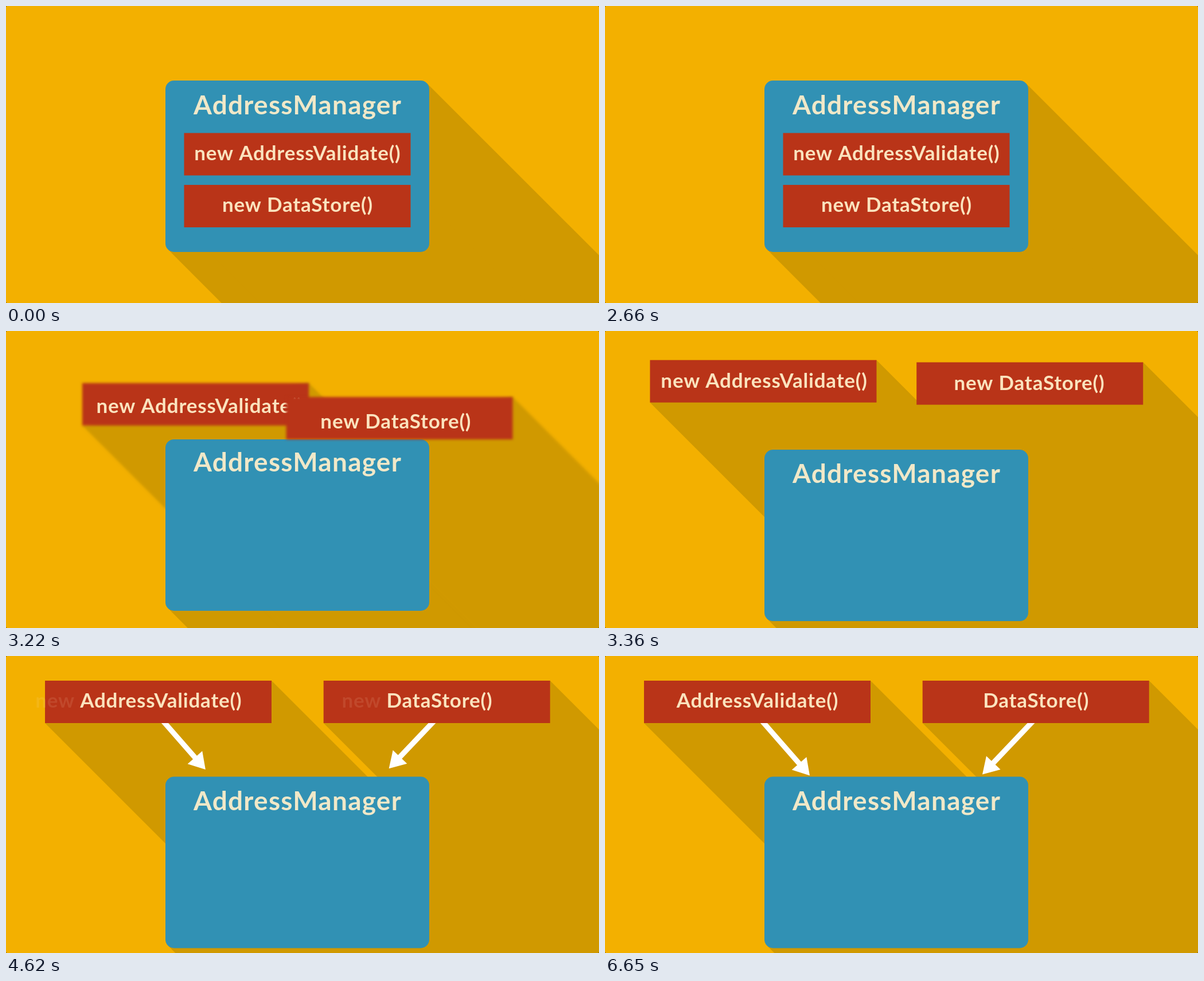
These frames come from a looping animation (1034 px wide and 518 px high, 6720 ms). An HTML page with a canvas:

```html
<!DOCTYPE html>
<html>
<head>
<meta charset="utf-8">
<style>
html, body { margin: 0; width: 100%; height: 100%; overflow: hidden; background: #4a3a10; }
canvas { display: block; border-radius: 2px; }
</style>
</head>
<body>
<canvas id="stage" width="1034" height="518"></canvas>
<script>
const ctx = document.getElementById('stage').getContext('2d');
const LOOP = 6720, STEP = 70, DURATION = 520, TEXT_LAG = 7;
const SPREAD_AT = 2999, INJECT_AT = 4330;
const YELLOW = '#f3b000', SHADE = '#d09900', BLUE = '#3191b4', RED = '#b93418';

const manager = { from: [278, 130], to: [278, 210.5], w: 460, h: 299, r: 15 };
const services = [
  { name: 'AddressValidate()', from: [310.5, 221.5], to: [68, 43], w: 395, h: 74 },
  { name: 'DataStore()', from: [310.5, 312], to: [553.7, 43], w: 395, h: 74 }
];
const arrows = [
  { tail: [277, 117], tip: [357, 208.5] },
  { tail: [743, 117], tip: [658, 206.5] }
];

const mix = (a, b, p) => a + (b - a) * p;
const place = (box, p) => box.from.map((v, i) => mix(v, box.to[i], p));

// Quick start with a long settle: cubic bezier (.6, 0, 0, 1)
function ease(t, start) {
  const x = Math.min(1, Math.max(0, (t - start) / DURATION));
  let lo = 0, hi = 1;
  for (let i = 0; i < 24; i++) {
    const s = (lo + hi) / 2;
    if (1.8 * s * (1 - s) ** 2 + s ** 3 < x) lo = s; else hi = s;
  }
  return x === 1 ? 1 : lo * lo * (3 - 2 * lo);
}

function longShadow([x, y], w, h, r = 0) {
  const c = r * (1 - Math.SQRT1_2), far = 1200;
  const right = x + w - c, top = y + c, left = x + c, bottom = y + h - c;
  ctx.fillStyle = SHADE;
  ctx.beginPath();
  ctx.moveTo(right, top);
  ctx.lineTo(right + far, top + far);
  ctx.lineTo(left + far, bottom + far);
  ctx.lineTo(left, bottom);
  ctx.fill();
}

function setFont(size, spacing, color) {
  ctx.font = `700 ${size}px Lato, sans-serif`;
  ctx.letterSpacing = spacing + 'px';
  ctx.fillStyle = color;
}

function drawArrow({ tail, tip }, p) {
  if (p <= 0) return;
  const dx = tip[0] - tail[0], dy = tip[1] - tail[1];
  const length = Math.hypot(dx, dy), end = mix(-2, length, p);
  ctx.save();
  ctx.translate(...tail);
  ctx.rotate(Math.atan2(dy, dx));
  ctx.fillStyle = '#fff';
  ctx.fillRect(-20, -4.6, end, 9.2);
  ctx.beginPath();
  ctx.moveTo(end, 0);
  ctx.lineTo(end - 28, -17);
  ctx.lineTo(end - 28, 17);
  ctx.fill();
  ctx.restore();
}

function drawLabel(box, p, injected) {
  const [x, y] = place(box, p);
  setFont(35, 0.8, '#fbe3be');
  const center = x + box.w / 2 + 0.4, base = y + 47.4;
  const prefix = ctx.measureText('new ').width, width = ctx.measureText(box.name).width;
  const start = center - (prefix + width) / 2;
  const nameX = mix(start + prefix, center - width / 2, injected);
  ctx.fillText(box.name, nameX, base);
  ctx.globalAlpha = 1 - injected;
  ctx.fillText('new ', nameX - prefix, base);
  ctx.globalAlpha = 1;
}

function draw(t) {
  const p = ease(t, SPREAD_AT), textP = ease(t - TEXT_LAG, SPREAD_AT);
  const injected = ease(t, INJECT_AT);
  const speed = ease(t + 20, SPREAD_AT) - ease(t - 20, SPREAD_AT);
  const blur = 20 * Math.max(0, speed - 0.05);
  const soften = () => { ctx.filter = blur > 0.1 ? `blur(${blur}px)` : 'none'; };

  ctx.fillStyle = YELLOW;
  ctx.fillRect(0, 0, 1034, 518);

  const home = place(manager, p);
  longShadow(home, manager.w, manager.h, manager.r);
  soften();
  for (const s of services) longShadow(place(s, p), s.w, s.h);
  ctx.filter = 'none';

  ctx.fillStyle = BLUE;
  ctx.beginPath();
  ctx.roundRect(...home, manager.w, manager.h, manager.r);
  ctx.fill();
  setFont(46, 1.25, '#f0e8c8');
  ctx.textAlign = 'center';
  ctx.fillText('AddressManager', 508.5, place(manager, textP)[1] + 58.5);
  ctx.textAlign = 'left';

  for (const a of arrows) drawArrow(a, injected);
  for (const s of services) {
    soften();
    ctx.fillStyle = RED;
    ctx.fillRect(...place(s, p), s.w, s.h);
    ctx.filter = 'none';
    drawLabel(s, textP, injected);
  }
}

const began = performance.now();
function tick() {
  const t = (performance.now() - began) % LOOP;
  draw(Math.floor(t / STEP) * STEP);
  requestAnimationFrame(tick);
}
tick();
</script>
</body>
</html>
```
